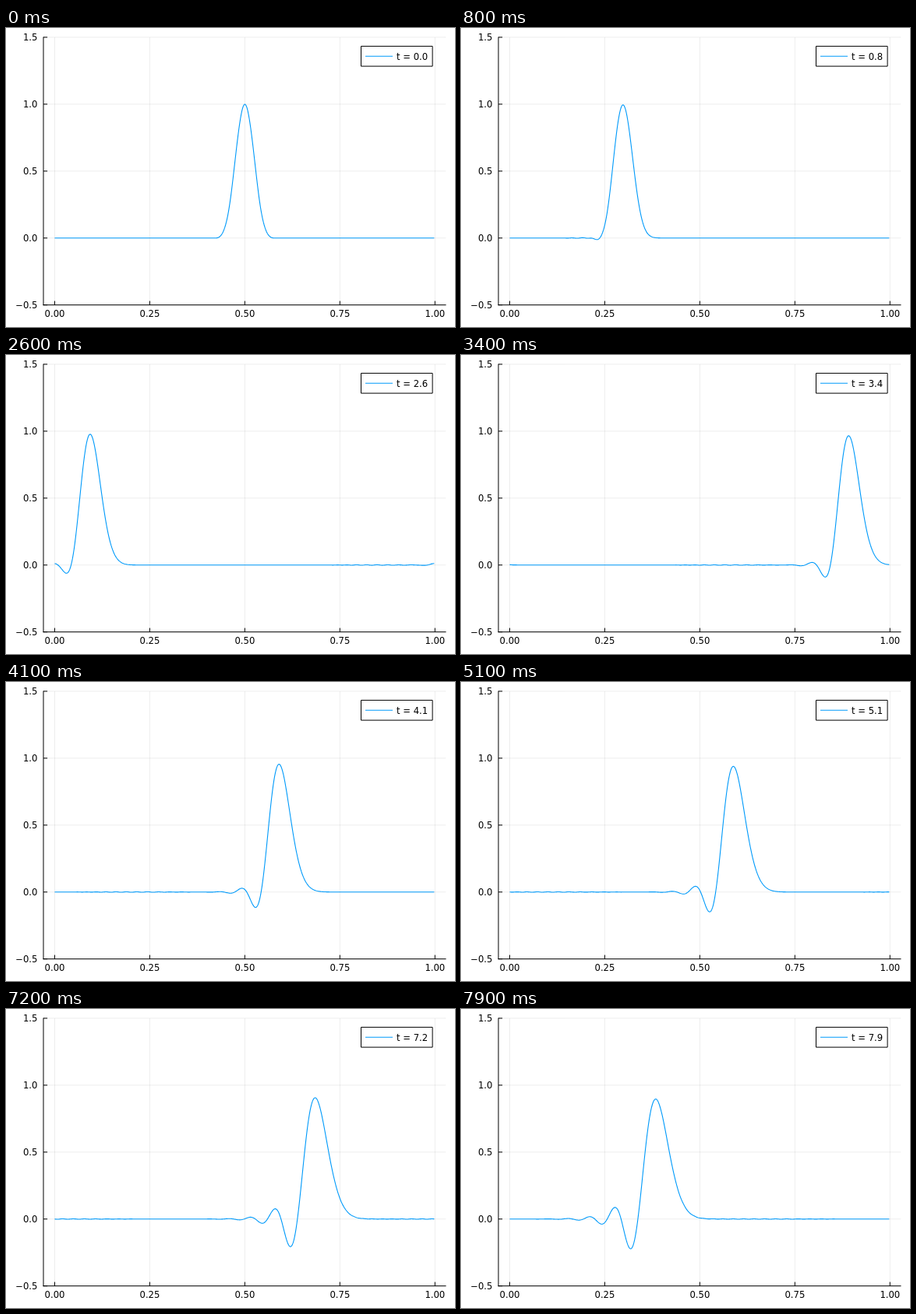
An HTML page with a canvas for the animation above (8 s loop, 576 px wide and 384 px high).

```html
<!DOCTYPE html>
<html>
<head>
<meta charset="utf-8">
<style>
html, body { margin: 0; width: 100%; height: 100%; overflow: hidden; background: #fff; }
canvas { display: block; width: 576px; height: 384px; }
</style>
</head>
<body>
<canvas id="plot" width="576" height="384"></canvas>
<script>
const ctx = document.getElementById('plot').getContext('2d');
const LOOP = 8000, STEP = 100;
const N = 512, DX = 1 / N, H = 0.04, MODES = 110;
const BLUE = '#009afa';
const px = x => 62.5 + x * 487.8;
const py = y => 269.75 - y * 171.9;

function line(x1, y1, x2, y2, color, width) {
  ctx.strokeStyle = color;
  ctx.lineWidth = width;
  ctx.beginPath();
  ctx.moveTo(x1, y1);
  ctx.lineTo(x2, y2);
  ctx.stroke();
}

function label(text, x, y, align) {
  ctx.fillStyle = '#000';
  ctx.textAlign = align;
  ctx.fillText(text, x, y);
}

// Spline pulse in Fourier modes, carried by a centred-difference scheme
const modes = [];
for (let m = 1; m <= MODES; m++) {
  const k = 2 * Math.PI * m, q = k * H / 2;
  modes.push({ k, amp: 3 * H * (Math.sin(q) / q) ** 4, freq: Math.sin(k * DX) / DX });
}

function wave(x, t) {
  let u = 1.5 * H;
  for (const { k, amp, freq } of modes) u += amp * Math.cos(k * (x - 0.5) - freq * t);
  return u;
}

function drawAxes() {
  const xs = [0, 0.25, 0.5, 0.75, 1], ys = [-0.5, 0, 0.5, 1, 1.5];
  const grid = 'rgba(0,0,0,0.1)';
  for (const x of xs) line(px(x), 12, px(x), 355.7, grid, 0.7);
  for (const y of ys) line(48, py(y), 564.3, py(y), grid, 0.7);
  line(47.5, 355.7, 564.5, 355.7, '#000', 1);
  line(48, 11.5, 48, 356.2, '#000', 1);
  for (const x of xs) {
    line(px(x), 355.7, px(x), 350.6, '#000', 1);
    label(x.toFixed(2), px(x), 371.2, 'center');
  }
  for (const y of ys) {
    line(48, py(y), 53.1, py(y), '#000', 1);
    label(y.toFixed(1).replace('-', '\u2212'), 40.4, py(y) + 4.2, 'right');
  }
}

function drawWave(t) {
  ctx.strokeStyle = BLUE;
  ctx.lineWidth = 1.1;
  ctx.lineJoin = 'round';
  ctx.beginPath();
  for (let i = 0; i < N; i++) ctx.lineTo(px(i * DX), py(wave(i * DX, t)));
  ctx.stroke();
}

function drawLegend(t) {
  ctx.fillStyle = '#fff';
  ctx.fillRect(455.5, 23.4, 91.6, 25.7);
  ctx.strokeStyle = '#000';
  ctx.lineWidth = 1;
  ctx.strokeRect(455.5, 23.4, 91.6, 25.7);
  line(461, 36.3, 496, 36.3, BLUE, 1.1);
  label('t = ' + t.toFixed(1), 501, 40.5, 'left');
}

let shown = -1;
function frame(now) {
  const step = Math.floor((now % LOOP) / STEP);
  if (step !== shown) {
    shown = step;
    const t = step / 10;
    ctx.fillStyle = '#fff';
    ctx.fillRect(0, 0, 576, 384);
    ctx.font = '11.6px "DejaVu Sans", sans-serif';
    drawAxes();
    drawWave(t);
    drawLegend(t);
  }
  requestAnimationFrame(frame);
}
const start = performance.now();
const tick = () => frame(Math.max(0, performance.now() - start));
frame(0);
</script>
</body>
</html>
```
